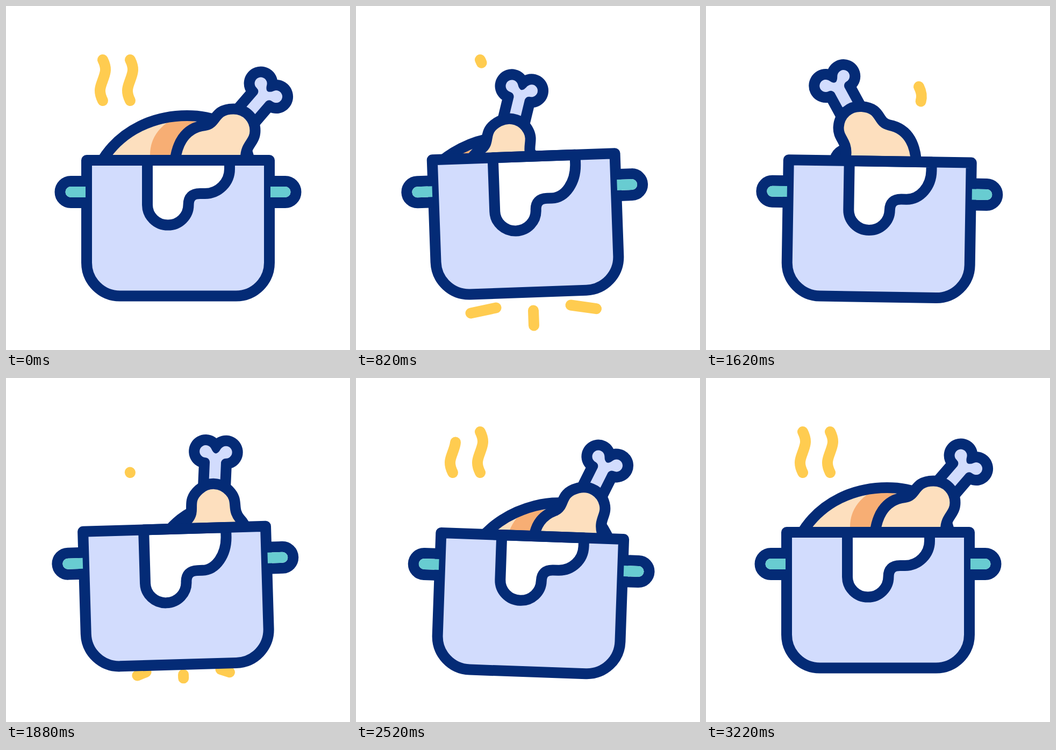
Write an HTML page that moves like this. It is 640 px wide and 640 px high and loops after 3.6 s.

```html
<!DOCTYPE html>
<html lang="en">
<head>
<meta charset="utf-8">
<title>Stirred pot</title>
<style>
  html, body { margin: 0; width: 100%; height: 100%; overflow: hidden; background: #fff; }
  svg { display: block; width: 100vw; height: 100vh; }
  .line { fill: none; stroke: #042b76; stroke-width: 20; stroke-linejoin: round; }
  .glow { fill: none; stroke: #ffcc50; stroke-width: 20; stroke-linecap: round; stroke-linejoin: round; }
  .meat { fill: #fddfbe; }
  .pale { fill: #d2dcfd; }
</style>
</head>
<body>
<svg viewBox="0 0 640 640">
  <defs>
    <clipPath id="aboveRim"><rect id="rimClip" x="-100" y="-200" width="840" height="487"/></clipPath>
    <path id="bodyShape" d="M-262 90Q-250 64-237 45C-205 0-150-28-86-28C-60-28-40-24-20-15Q30 10 35 90Z"/>
    <path id="boneShape" d="M-10.500-40V-81Q-12-88-19-88.500A11.500 11.500 0 1 1-9-106Q0-88 9-106
      A11.500 11.500 0 1 1 19-88.500Q12-88 10.500-81V-40Z"/>
    <path id="potShape" d="M150 287H490V477.500A62 62 0 0 1 428 539.500H212A62 62 0 0 1 150 477.500Z"/>
  </defs>
  <g id="steam" class="glow"></g>
  <g id="sparks" class="glow"></g>
  <g clip-path="url(#aboveRim)">
    <g id="chicken">
      <g id="body">
        <use href="#bodyShape" class="meat"/>
        <path fill="#f7ae74" d="M-155 90V45Q-155 6-119-18Q-85-30-40 0V90Z"/>
        <use href="#bodyShape" class="line"/>
      </g>
      <circle id="tail" class="line meat" cx="-50" cy="47"/>
      <use href="#boneShape" class="line" style="stroke-width:40"/>
      <use href="#boneShape" class="pale"/>
      <path id="drum" class="line" style="fill:#fddfbe"/>
    </g>
  </g>
  <g id="pot">
    <use href="#potShape" class="pale"/>
    <path id="drip" class="line" style="fill:#fff"/>
    <use href="#potShape" class="line"/>
    <path class="line" d="M150 326H120.500a20 20 0 0 0 0 40H150M490 326H519.500a20 20 0 0 1 0 40H490"/>
    <path fill="#68ccd1" d="M148 336H120.500a10 10 0 0 0 0 20H148ZM492 336H519.500a10 10 0 0 1 0 20H492Z"/>
  </g>
</svg>
<script>
const LOOP = 3600, START = 220, END = 3200, BEAT = 570, HOME_LEAN = 40.8;
const $ = id => document.getElementById(id);
const set = (el, name, value) => el.setAttribute(name, value);
const clamp = v => Math.min(1, Math.max(0, v));
const mix = (a, b, m) => a + (b - a) * m;
const rad = deg => deg * Math.PI / 180;

// Eased step from 0 to 1, and a rise followed by a fall.
const ease = (t, from, to) => (1 - Math.cos(Math.PI * clamp((t - from) / (to - from)))) / 2;
const hump = (t, from, peak, to) => ease(t, from, peak) - ease(t, peak, to);

// Rocking between -1 and 1, at rest before the first swing and after the last.
function rock(t) {
  const first = 850, last = first + 3 * BEAT;
  let v = -ease(t, START, first) - ease(t, last, END);
  for (let i = 0; i < 3; i++) v += 2 * (-1) ** i * ease(t, first + i * BEAT, first + (i + 1) * BEAT);
  return v;
}

function rotate([x, y], deg) {
  const c = Math.cos(rad(deg)), s = Math.sin(rad(deg));
  return [x * c - y * s, x * s + y * c];
}

// Leg outline around its knuckle, with the bone upright; the other pose is its mirror image.
const legRight = [
  [-110, 80], [-110, 20], [-87, -6], [-53, -10], [-30, -13], [-38, -40], [0, -40.5], [24, -40.5],
  [40.5, -22], [40.5, 0], [40.5, 22], [23, 25], [23, 50], [23, 60], [23, 70], [25, 90]
].map(p => rotate(p, -HOME_LEAN));
const legLeft = legRight.map(([x, y]) => rotate([-x, y], -8)).reverse();

function legPath(m) {
  const p = legRight.map((a, i) => a.map((v, k) => mix(v, legLeft[i][k], m).toFixed(2)).join(' '));
  return `M${p[0]}C${p.slice(1).join(' ')}Z`;
}

function drawChicken(t) {
  const swing = ease(t, 705, 1230) - ease(t, 1427, 2150);
  const nod = ease(t, START, 820) - ease(t, 2150, 3150);
  const lean = HOME_LEAN - 20.4 * nod - 58.8 * swing;
  const x = 423 - 224 * hump(t, 240, 1250, 2110);
  const y = 232 + 18.5 * hump(t, START, 820, 1140) - 4.6 * hump(t, 1140, 1620, 1850)
    + 23 * hump(t, 1750, 2160, 2900);
  const turned = clamp((swing - 0.12) / 0.7);
  set($('chicken'), 'transform', `translate(${x} ${y}) rotate(${lean})`);
  set($('body'), 'transform', `rotate(${-HOME_LEAN}) scale(${1 - turned})`);
  set($('tail'), 'r', 27 * turned);
  set($('drum'), 'd', legPath(turned));
}

function drawPot(t) {
  const move = `translate(0 ${6.9 * rock(t + 35)}) rotate(${2.05 * rock(t)} 320 522)`;
  set($('pot'), 'transform', move);
  set($('rimClip'), 'transform', move);
  const sag = 17.5 * (hump(t, START, 770, 1300) + hump(t, 1300, 1980, 2530));
  set($('drip'), 'd', `M263 287V${370 + sag}a38.250 37.500 0 0 0 76.500 0Q339.500 ${349 + sag} 361 ${349 + sag}
    H370A46 ${46 + sag} 0 0 0 416 303V287Z`);
}

function addPath(parent) {
  return $(parent).appendChild(document.createElementNS('http://www.w3.org/2000/svg', 'path'));
}

// Wisps grow from the bottom and leave through the top.
function wisp(x, y, show, hide, duration) {
  const el = addPath('steam');
  set(el, 'd', `M${x} ${y + 76}c-9-18-4-26 0-38s9-20 0-38`);
  set(el, 'pathLength', 1);
  return t => {
    const shown = ease(t, show, show + duration), hidden = ease(t, hide, hide + duration);
    const visibleAtStart = hide < show;
    const from = visibleAtStart && t >= show ? 0 : hidden;
    const to = visibleAtStart && t < show ? 1 : shown;
    set(el, 'visibility', to - from > 0.002 ? 'visible' : 'hidden');
    set(el, 'stroke-dasharray', `${Math.max(0, to - from)} 2`);
    set(el, 'stroke-dashoffset', -from);
  };
}
const wisps = [
  wisp(180, 100, 2177, START, 520),
  wisp(231, 100, 1856, 394, 520),
  wisp(396, 150, 1145, 1414, 350),
  wisp(447, 150, 835, 1230, 350)
];

// Three rays fan out from under the pot; the second burst is weaker.
const rays = [-1, 0, 1].map(side => ({ side, el: addPath('sparks') }));
function drawSparks(t) {
  const strong = t < 1400;
  const power = strong ? 1 : 0.4;
  const burst = strong ? hump(t, 320, 820, 1080) : hump(t, 1580, 2150, 2400);
  for (const { side, el } of rays) {
    const outer = Math.abs(side);
    const x = 330 + 69.5 * side;
    const y = 566.5 - 7.5 * outer - 2.5 * side - 32 * (1 - burst);
    const angle = rad(88 - side * (63 + 17 * power));
    const length = (1 + 20 * outer + 27 * power) * burst;
    set(el, 'd', `M${x} ${y}l${length * Math.cos(angle)} ${length * Math.sin(angle)}`);
    set(el, 'visibility', burst > 0 ? 'visible' : 'hidden');
  }
}

function draw(t) {
  drawChicken(t);
  drawPot(t);
  drawSparks(t);
  wisps.forEach(drawWisp => drawWisp(t));
}

const start = performance.now();
function tick() {
  draw((performance.now() - start) % LOOP);
  requestAnimationFrame(tick);
}
tick();
</script>
</body>
</html>
```
